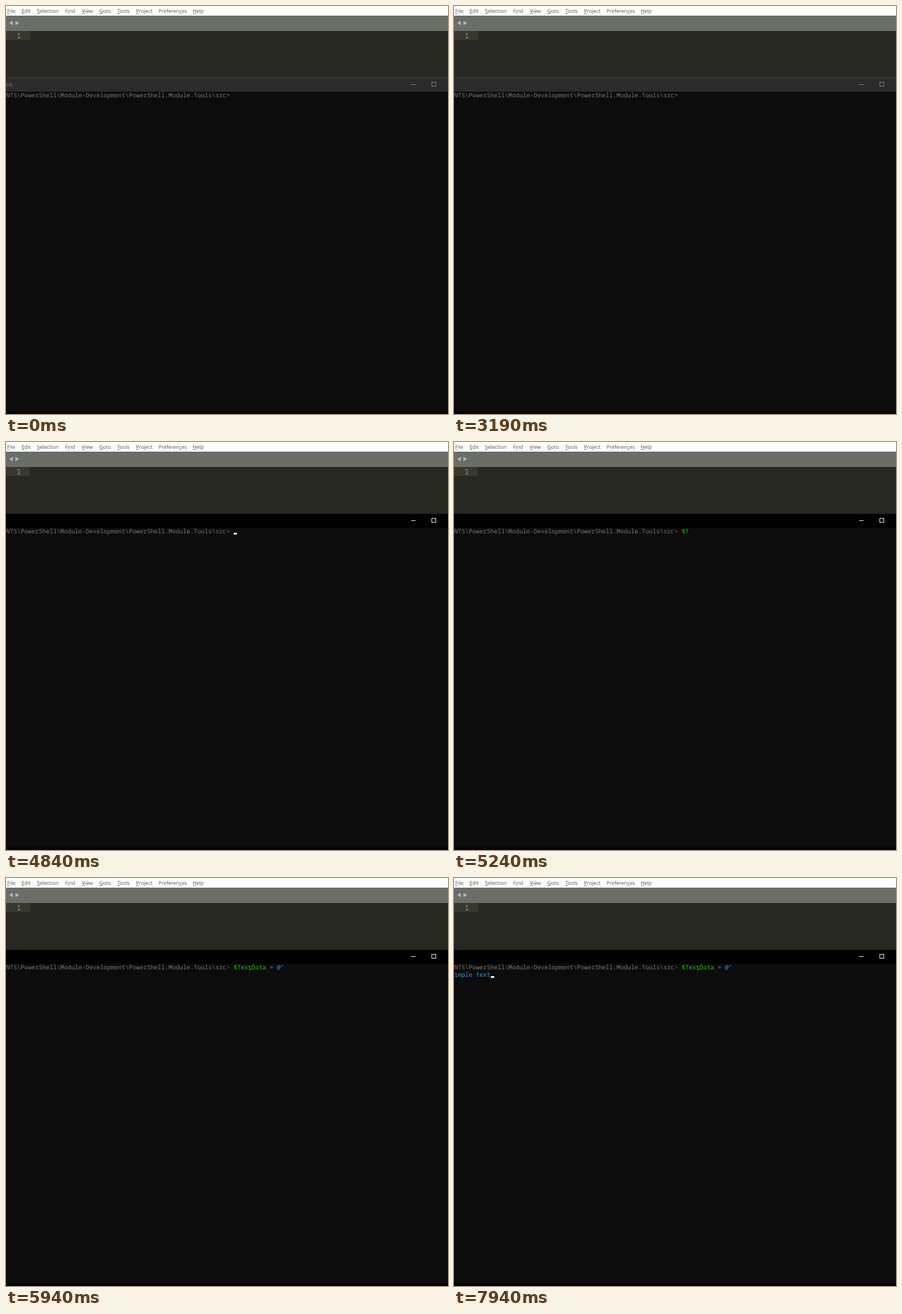
Write an HTML page with a canvas that moves like this. It is 779 px wide and 719 px high and loops after 8000 ms.

```html
<!DOCTYPE html>
<html lang="en">
<head>
<meta charset="utf-8">
<title>Terminal typing</title>
<style>
html, body { margin: 0; width: 100%; height: 100%; overflow: hidden; background: #0c0c0c; }
canvas { display: block; }
</style>
</head>
<body>
<canvas id="stage" width="779" height="719"></canvas>
<script>
const W = 779, H = 719, LOOP = 8000;
const ctx = document.getElementById('stage').getContext('2d');
ctx.textRendering = 'geometricPrecision';

const UI = '9px "Open Sans", "Noto Sans", sans-serif';
const MONO = '10.6px "Noto Sans Mono", "DejaVu Sans Mono", monospace';
const PITCH = 6.36, LEFT = 0.5;
const GREY = '#767676', GREEN = '#16c60c', BLUE = '#3a96dd';

const PATH = 'NTS\\PowerShell\\Module-Development\\PowerShell.Module.Tools\\src';
const INPUT = PATH.length + 2;

// Label, left edge, index of the underlined letter
const MENU = [
  ['File', 2, 0], ['Edit', 27.5, 0], ['Selection', 54.5, 0], ['Find', 104, 1],
  ['View', 133.5, 0], ['Goto', 164.5, 0], ['Tools', 196, 0],
  ['Project', 229, 0], ['Preferences', 269, 8], ['Help', 329, 0]
];

// Time and number of characters typed on each line
const COMMAND = [
  [5180, 1], [5240, 2], [5310, 3], [5380, 4], [5450, 5], [5520, 6],
  [5590, 7], [5660, 8], [5730, 9], [5800, 11], [5870, 14]
];
const BODY = [
  [7400, 1], [7460, 2], [7530, 3], [7600, 4], [7670, 5],
  [7740, 7], [7800, 8], [7870, 9], [7940, 10]
];

const typed = (steps, t) => steps.reduce((n, [at, count]) => t >= at ? count : n, 0);
const between = (t, a, b) => t >= a && t < b;

function rect(x, y, w, h, color) {
  ctx.fillStyle = color;
  ctx.fillRect(x, y, w, h);
}

function text(str, x, y, color, font) {
  ctx.font = font;
  ctx.fillStyle = color;
  ctx.fillText(str, x, y);
}

function mono(str, col, row, color) {
  text(str, LEFT + col * PITCH, 161 + row * 13, color, MONO);
}

function cursor(col, row) {
  rect(Math.round(LEFT + col * PITCH), 160 + row * 13, 6, 3, '#fff');
}

function triangle(tip, base, y) {
  ctx.fillStyle = '#a9b5c6';
  ctx.beginPath();
  ctx.moveTo(tip, y);
  ctx.lineTo(base, y - 4);
  ctx.lineTo(base, y + 4);
  ctx.fill();
}

function editor() {
  rect(0, 0, W, 17, '#fff');
  for (const [label, x, key] of MENU) {
    text(label, x, 12, '#505050', UI);
    const start = ctx.measureText(label.slice(0, key)).width;
    const width = ctx.measureText(label[key]).width;
    rect(x + start, 13, width, 1, '#808080');
  }

  rect(0, 17, W, 27, '#6b6d67');
  triangle(5.5, 12, 30);
  triangle(23, 16.5, 30);

  rect(0, 44, W, 82, '#272822');
  rect(0, 44, 42, 16, '#38382d');
  text('1', 18.5, 57, '#90908a', '13.4px "Noto Sans Mono", "DejaVu Sans Mono", monospace');
}

function titleBar(t) {
  const active = t >= 4310;
  rect(0, 126, W, 25, active ? '#000' : '#2b2b2b');
  rect(0, 126, W, 1, active ? '#171814' : '#40413d');
  if (t < 3190) text('54)', -1.5, 142, '#7c7c7c', UI);

  const icon = active ? '#fff' : '#848484';
  rect(714, 138, 8, 1, icon);
  ctx.strokeStyle = icon;
  ctx.lineWidth = 1;
  ctx.strokeRect(750.5, 134.5, 7, 7);
}

function terminal(t) {
  rect(0, 151, W, H - 151, '#0c0c0c');
  rect(0, 714, W, 5, '#080405');

  mono(PATH, 0, 0, GREY);
  mono('>', PATH.length, 0, t >= 5800 ? '#565656' : GREY);

  const n = typed(COMMAND, t);
  mono('$TextData'.slice(0, n), INPUT, 0, GREEN);
  if (n >= 11) mono('=', INPUT + 10, 0, GREY);
  if (n >= 14) mono('@"', INPUT + 12, 0, t >= 5940 ? BLUE : GREY);
  if (t >= 5450) rect(428, 161, 5, 1, '#129a0b');

  mono('imple text'.slice(0, typed(BODY, t)), 0, 1, BLUE);

  if (between(t, 4840, 5120)) cursor(INPUT, 0);
  if (between(t, 5380, 5450)) cursor(INPUT + 4, 0);
  if (t >= 7940) rect(65, 173, 6, 3, '#fff');
}

function draw(now) {
  const t = now % LOOP;
  editor();
  titleBar(t);
  terminal(t);
  requestAnimationFrame(draw);
}

const begin = performance.now();
draw(0);
function draw0() { return performance.now() - begin; }
</script>
</body>
</html>
```
